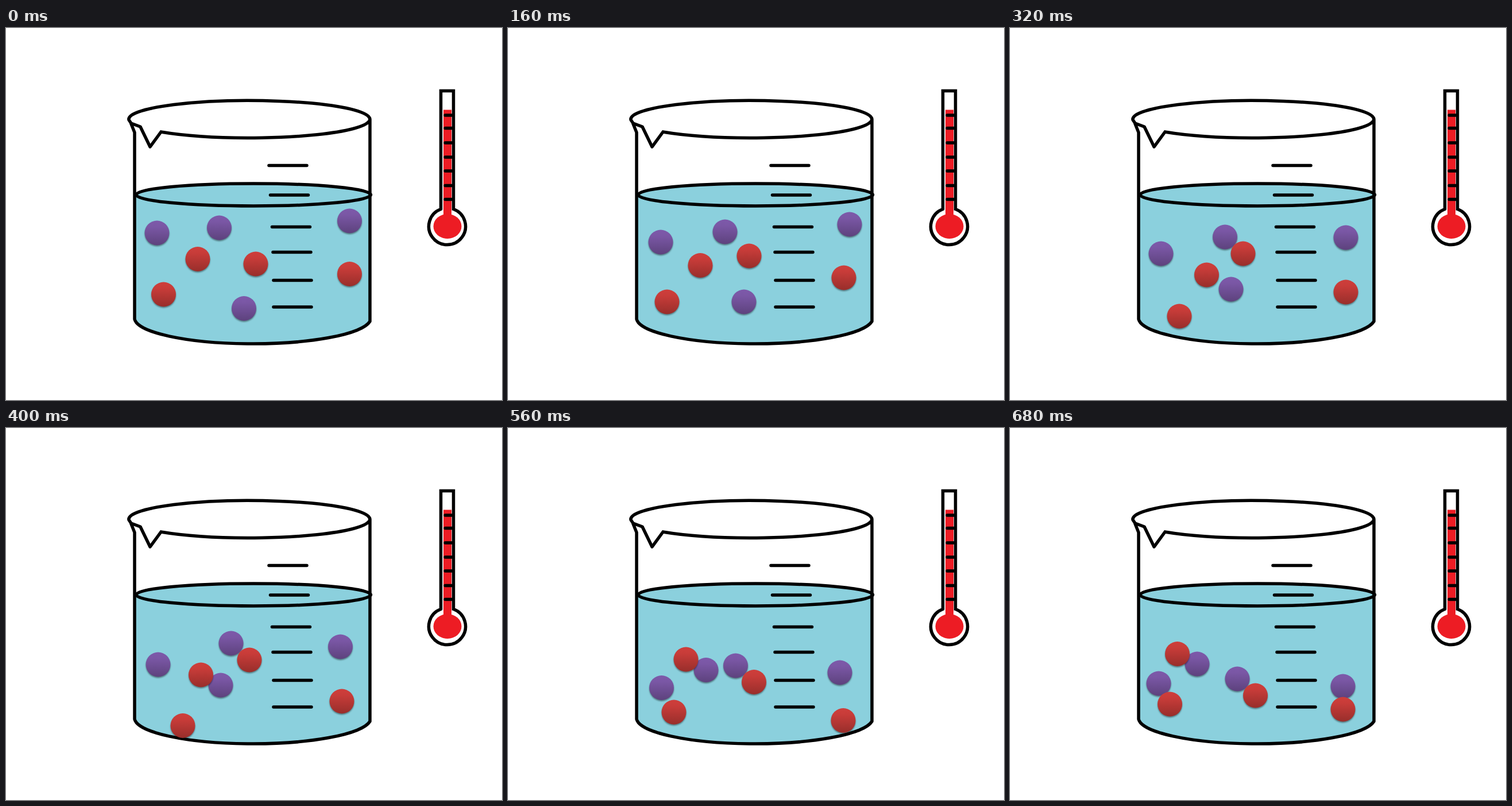
Animation, 864 px wide and 648 px high, one loop 720 ms. Source, as an HTML page:

```html
<!DOCTYPE html>
<html lang="en">
<head>
<meta charset="utf-8">
<title>Particles in a heated beaker</title>
<style>
  html, body { margin: 0; height: 100%; overflow: hidden; background: #fff; }
  svg { display: block; width: 100vw; height: 100vh; }
  .line { fill: none; stroke: #000; stroke-width: 5.5; stroke-linecap: round; stroke-linejoin: round; }
  .ball { filter: drop-shadow(0 2px 1.3px rgba(0, 0, 0, .4)); }
</style>
</head>
<body>
<svg viewBox="0 0 864 648">
  <defs>
    <linearGradient id="purple" x2="0" y2="1">
      <stop stop-color="#7d59aa"/><stop offset=".25" stop-color="#7a57a5"/><stop offset="1" stop-color="#5d427d"/>
    </linearGradient>
    <linearGradient id="red" x2="0" y2="1">
      <stop stop-color="#ce3e3b"/><stop offset=".25" stop-color="#c83c39"/><stop offset="1" stop-color="#982e2b"/>
    </linearGradient>
  </defs>

  <path fill="#8bd0dd" d="M224 291A206 20 0 0 1 634 291V511A206 45 0 0 1 224 507Z"/>
  <path fill="#fff" d="M222 262H636V290.5H635.5A204.500 19.500 0 0 0 226.500 290.500H222Z"/>
  <g class="line">
    <ellipse cx="431" cy="290.500" rx="204.500" ry="19.500"/>
    <path d="M270 181A210 32.500 0 1 0 214 160L218 166L234 172L251 207L270 181M218 167L224 182V507A206 45 0 0 0 634 511V159"/>
    <path d="M458 239.500h66M460.500 291h66M463.500 346.500h66M465 390.500h66M466 439.500h66M466 486h66"/>
  </g>

  <path class="line" style="stroke-linejoin:miter" d="M757.500 315.500V109.500H779.500V315.500A32 32 0 1 1 757.500 315.500"/>
  <g fill="#ed1c24">
    <ellipse cx="769" cy="345.500" rx="24.500" ry="21.500"/>
    <path d="M762 142.500h14V328h-14z"/>
  </g>
  <path class="line" d="M765 152h13m-13 22.500h13m-13 25.500h13m-13 25h13m-13 24h13m-13 25.500h13m-13 24h13"/>

  <g id="balls"></g>
</svg>
<script>
const LOOP = 720, STEP = 40;
const times = [0, 160, 320, 400, 480, 560, 680];

// Waypoints of each ball at the times above
const routes = {
  purple: [
    '263,357 266,373 263,393 265,412 265,436 267.5,452.5 259,445',
    '371.5,348 378,355 374.5,364 392,375 392,397 396.5,414 396,437',
    '598.5,336 595,342 585,365 582.5,381 578,403.500 578,426 580,450',
    '414.5,488.5 411,477 385,455 374,448 366,435.500 345,421.500 326,411'
  ],
  red: [
    '334,402.500 335,413.500 342.5,430 339.5,430 331.5,416.500 310,403 291.500,393.500',
    '435,411 420,397 406,393 424,404 424,425.500 428.5,442.500 427.5,466',
    '598.5,428.500 585,435 585,460 585,476 585,498.500 584,509.500 580,490',
    '274.500,464 277,477 295,502 308,518.500 297,504 289,495 278.500,481'
  ]
};

const group = document.getElementById('balls');
const balls = Object.entries(routes).flatMap(([color, list]) => list.map(route => {
  const node = document.createElementNS(group.namespaceURI, 'circle');
  node.setAttribute('class', 'ball');
  node.setAttribute('r', 21.5);
  node.setAttribute('fill', `url(#${color})`);
  group.append(node);
  return { node, points: route.split(' ').map(p => p.split(',').map(Number)) };
}));

function draw() {
  const t = Math.floor(performance.now() % LOOP / STEP) * STEP;
  const next = times.findIndex((time, k) => k && t <= time);
  const part = (t - times[next - 1]) / (times[next] - times[next - 1]);
  for (const { node, points } of balls) {
    const [x, y] = points[next - 1].map((a, k) => a + (points[next][k] - a) * part);
    node.setAttribute('cx', x);
    node.setAttribute('cy', y);
  }
  requestAnimationFrame(draw);
}
draw();
</script>
</body>
</html>
```
